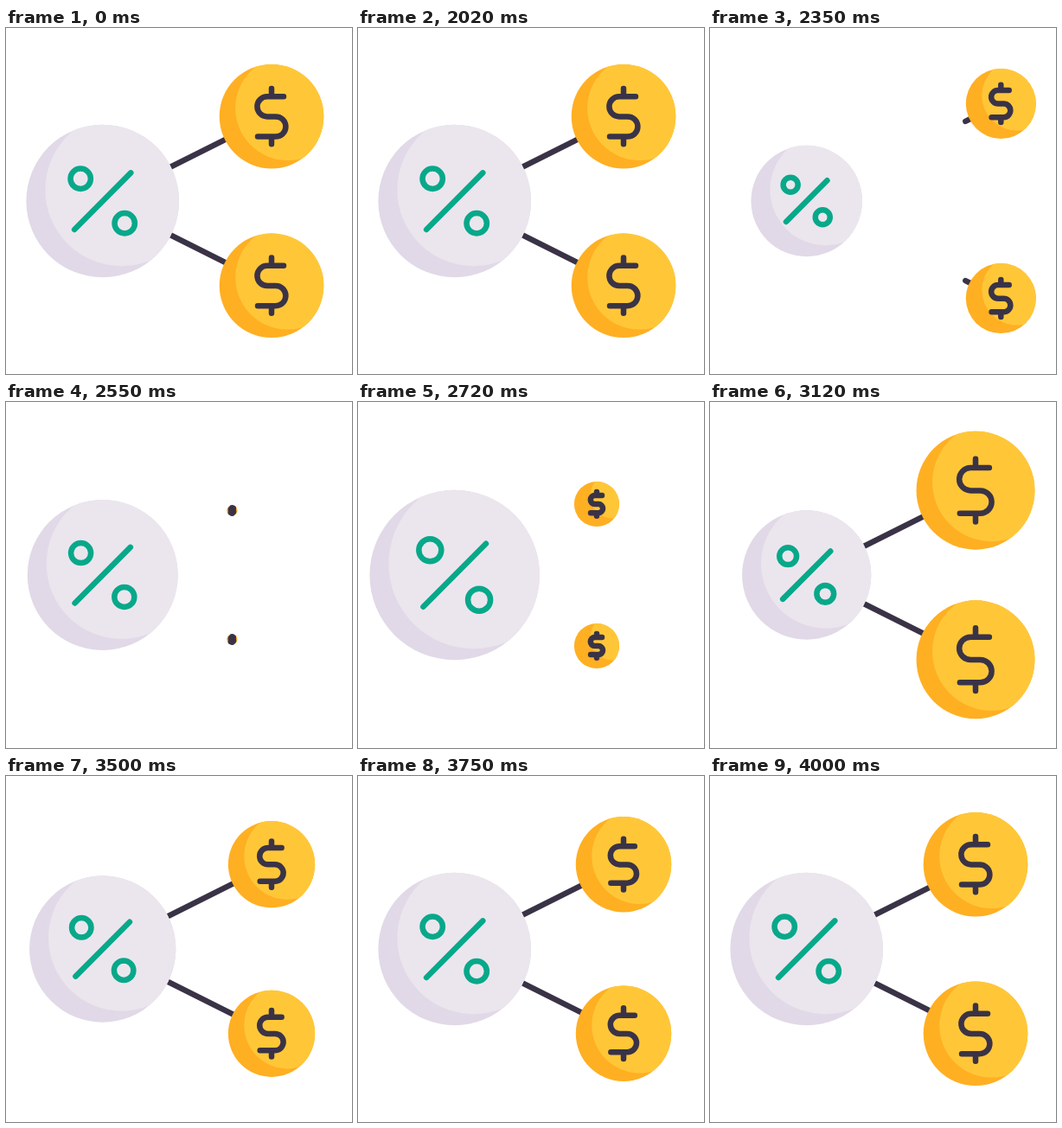
An HTML page that plays this animation: 400x400 px, repeating every 4.02 s.

```html
<!DOCTYPE html>
<html lang="en">
<head>
<meta charset="utf-8">
<title>Percent split</title>
<style>
  html, body { margin: 0; width: 100%; height: 100%; overflow: hidden; background: #fff; }
  svg { display: block; width: 100vw; height: 100vh; }
</style>
</head>
<body>
<svg id="stage" viewBox="0 0 400 400" fill="none" stroke-linecap="round" stroke-linejoin="round"></svg>
<script>
const LOOP = 4020;
const STROKE = 6.5;
const INK = '#3a3347';
const HUB = { x: 111.7, y: 200, r: 88.3 };
const COIN = { x: 307, y: 102.2, r: 60.3 };
const EXIT = { x: 89.4, y: -45 };
const ENTRY = { x: -50, y: 25.5 };
const START = 2020, SWAP = 2500, LANDED = 3115;

const PERCENT = 'M-32.6 33L32.6 -32.6' + ring(-25.5, -25.8) + ring(25.5, 25.8);
const DOLLAR = 'M14 -23H-5a11.6 11.6 0 0 0 0 23.2H4.8a11.6 11.6 0 0 1 0 23.2H-16M0 -32.2V-23M0 23.4V32';

const stage = document.getElementById('stage');
const clamp = v => Math.min(1, Math.max(0, v));
const lerp = (a, b, k) => a + (b - a) * k;
const progress = (t, from, to) => clamp((t - from) / (to - from));
const smooth = k => k * k * (3 - 2 * k);

function ring(x, y, r = 11.7) {
  return `M${x - r} ${y}a${r} ${r} 0 1 0 ${2 * r} 0a${r} ${r} 0 1 0 ${-2 * r} 0z`;
}

function add(parent, tag, attrs) {
  const node = document.createElementNS('http://www.w3.org/2000/svg', tag);
  set(node, attrs);
  return parent.appendChild(node);
}

function set(node, attrs) {
  for (const key in attrs) node.setAttribute(key, attrs[key]);
}

// A shaded disc: the highlight keeps a fixed offset while the radius changes.
function makeDisc(id, baseR, shade, light, dx, dy, glyph, ink) {
  const group = add(stage, 'g', {});
  const mask = add(add(group, 'clipPath', { id }), 'circle', {});
  const base = add(group, 'circle', { fill: shade });
  const lit = add(add(group, 'g', { 'clip-path': `url(#${id})` }), 'circle', { cx: dx, cy: dy, fill: light });
  const mark = add(group, 'path', { d: glyph, stroke: ink });
  return (x, y, r) => {
    const visible = r > 0.5;
    set(group, { transform: `translate(${x} ${y})`, display: visible ? 'inline' : 'none' });
    if (!visible) return;
    for (const circle of [mask, base, lit]) set(circle, { r });
    const scale = r / baseR;
    set(mark, { transform: `scale(${scale})`, 'stroke-width': STROKE / scale });
  };
}

const lines = [0, 1].map(() => add(stage, 'line', { stroke: INK, 'stroke-width': STROKE }));
const drawCoins = [0, 1].map(i =>
  makeDisc('coin' + i, COIN.r, '#ffaf22', '#ffc738', 18.5, -9.5, DOLLAR, INK));
const drawHub = makeDisc('hub', HUB.r, '#e1d9e7', '#ebe6ed', 22, -13, PERCENT, '#08a88a');

function hubScale(t) {
  if (t < 2360) return lerp(1, 0.727, smooth(progress(t, START, 2360)));
  if (t < 2687) return lerp(0.727, 1.14, smooth(progress(t, 2360, 2687)));
  if (t < 3070) return lerp(1.14, 0.83, progress(t, 2687, 3070));
  return lerp(0.83, 1, progress(t, 3070, 3640));
}

// Position, radius and the drawn part of the connecting line.
function coinPose(t) {
  if (t < SWAP) {
    const k = progress(t, START, SWAP) ** 3;
    return {
      x: COIN.x + EXIT.x * k, y: COIN.y + EXIT.y * k, r: COIN.r * (1 - k),
      from: smooth(progress(t, START, 2475)), to: 1
    };
  }
  const k = 1 - (1 - progress(t, SWAP, LANDED)) ** 1.07;
  const scale = t < LANDED ? 1.14 * k
    : t < 3497 ? lerp(1.14, 0.83, progress(t, LANDED, 3497))
    : lerp(0.83, 1, progress(t, 3497, 4000));
  return {
    x: COIN.x + ENTRY.x * (1 - k), y: COIN.y + ENTRY.y * (1 - k), r: COIN.r * scale,
    from: 0, to: k
  };
}

function render(t) {
  const coin = coinPose(t);
  [coin.y, 400 - coin.y].forEach((y, i) => {
    drawCoins[i](coin.x, y, coin.r);
    set(lines[i], {
      x1: lerp(HUB.x, coin.x, coin.from), y1: lerp(HUB.y, y, coin.from),
      x2: lerp(HUB.x, coin.x, coin.to), y2: lerp(HUB.y, y, coin.to),
      display: coin.from < 1 ? 'inline' : 'none'
    });
  });
  drawHub(HUB.x, HUB.y, HUB.r * hubScale(t));
}

const began = performance.now();
function tick() {
  render((performance.now() - began) % LOOP);
  requestAnimationFrame(tick);
}
tick();
</script>
</body>
</html>
```
